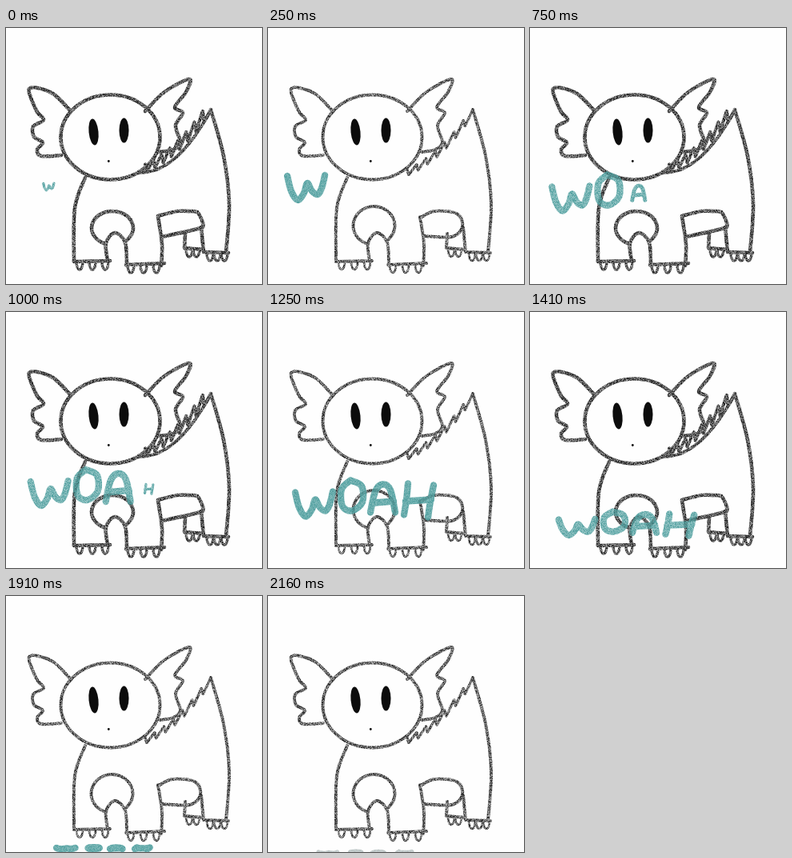
An HTML page with a canvas for the animation above (10 s loop, 320 by 320 pixels).

```html
<!DOCTYPE html>
<html lang="en">
<head>
<meta charset="utf-8">
<title>Woah</title>
<style>
html, body { margin: 0; width: 100%; height: 100%; overflow: hidden; background: #fefefe; }
canvas { display: block; width: 100vw; height: 100vh; }
</style>
</head>
<body>
<canvas id="stage" width="320" height="320"></canvas>
<script>
const SIZE = 320, LOOP = 10000, LAST = 26;
const ctx = document.getElementById('stage').getContext('2d');
const clamp = (v, lo, hi) => Math.min(hi, Math.max(lo, v));
const points = s => s.split(' ').map(p => p.split(',').map(Number));

function layer() {
  const c = document.createElement('canvas');
  c.width = c.height = SIZE;
  const g = c.getContext('2d');
  g.lineCap = g.lineJoin = 'round';
  return g;
}

function random(seed) {
  return () => {
    seed = (Math.imul(seed, 1664525) + 1013904223) >>> 0;
    return seed / 4294967296;
  };
}

// Speckle that is rubbed out of a stroke to give it a crayon grain
function grain(seed, strength) {
  const g = layer(), img = g.createImageData(SIZE, SIZE), rnd = random(seed);
  for (let i = 3; i < img.data.length; i += 4) img.data[i] = 255 * strength * rnd();
  g.putImageData(img, 0, 0);
  return g.canvas;
}

function rub(g, mask) {
  g.globalCompositeOperation = 'destination-out';
  g.drawImage(mask, 0, 0);
  g.globalCompositeOperation = 'source-over';
}

function soften(g) {
  const out = layer();
  out.filter = 'blur(0.5px)';
  out.drawImage(g.canvas, 0, 0);
  return out.canvas;
}

// Smooth curve through all points; tension 0 gives straight segments
function curve(g, p, tension = 1) {
  const k = tension / 6;
  g.beginPath();
  g.moveTo(...p[0]);
  for (let i = 0; i < p.length - 1; i++) {
    const a = p[i - 1] || p[i], b = p[i], c = p[i + 1], d = p[i + 2] || c;
    g.bezierCurveTo(b[0] + (c[0] - a[0]) * k, b[1] + (c[1] - a[1]) * k,
      c[0] - (d[0] - b[0]) * k, c[1] - (d[1] - b[1]) * k, c[0], c[1]);
  }
  g.stroke();
}

function oval(g, x, y, rx, ry, turn = 0, from = 0, to = 7) {
  g.beginPath();
  g.ellipse(x, y, rx, ry, turn, from, to);
}

// The back line, s pixels to the left of the tail tip
const back = (s, dy) => [256 - s, 104 + 1.45 * s - 0.0065 * s * s + dy];

function mane(g, { teeth, up, down }) {
  const zig = [[256, 102]], gap = 82 / teeth;
  for (let i = 1; i <= teeth; i++) {
    zig.push(back(gap * i - 2, down), back(gap * i, up * (1 - 0.4 * i / teeth)));
  }
  curve(g, zig, 0.3);
}

const outlines = [
  '81,104 60,83 40,75 29,76 31,87 39,105 47,115 34,123 35,136 46,143 39,152 44,160 69,159',
  '174,104 198,80 229,64 225,80 211,99 221,106 212,122 218,143 209,152 192,155',
  '99,187 86,225 85,292',
  '256,102 272,160 279,220 275,281',
  '127,291 125,269 136,256 149,268 151,297',
  '194,297 195,270 190,236'
].map(points);
const feet = ['85,292 130,291', '150,296 198,294', '224,257 223,275 247,277', '244,249 247,280 278,281'].map(points);
const toes = [[92, 292, 3, 16], [156, 296, 3, 16], [229, 276, 2, 9], [255, 281, 3, 9]];

const looks = [
  { width: 4.6, ink: '#161616', erase: 0.62, knee: [133, 250, 26, 21],
    thigh: '190,235 214,229 239,230 246,249 195,261', bend: 0.4,
    mane: { teeth: 8, up: -15, down: 1 }, spine: true },
  { width: 3.9, ink: '#1e1e1e', erase: 0.68, knee: [132.5, 247, 26, 24],
    thigh: '191,237 208,229 236,232 243,248 230,261 196,260', bend: 1,
    mane: { teeth: 7, up: -5, down: 5 } }
];

function creature(look, i) {
  const g = layer();
  g.strokeStyle = g.fillStyle = look.ink;
  g.lineWidth = look.width;
  oval(g, 130.5, 136.5, 62, 53);
  g.stroke();
  oval(g, ...look.knee, 0, 2, 7.1);
  g.stroke();
  outlines.forEach(p => curve(g, p));
  feet.forEach(p => curve(g, p, 0));
  curve(g, points(look.thigh), look.bend);
  g.lineWidth = look.width - 0.6;
  mane(g, look.mane);
  if (look.spine) curve(g, [0, 22, 45, 68, 90].map(s => back(s, 7 * Math.sin(s / 28))));
  g.lineWidth = look.width - 1.2;
  for (const [x0, y, n, step] of toes) {
    for (let x = x0; x < x0 + n * step; x += step) {
      oval(g, x, y, 4, 10, 0, 0, Math.PI);
      g.stroke();
    }
  }
  rub(g, grain(11 + i, look.erase));
  g.fillStyle = '#0c0c0c';
  for (const eye of [[109.5, 130, 6, 16.5, -0.1], [147.5, 128, 6, 15.5, 0], [128.3, 166.5, 1.4, 1.4]]) {
    oval(g, ...eye);
    g.fill();
  }
  return soften(g);
}

const poses = looks.map(creature);
const chalk = [grain(31, 0.45), grain(32, 0.3)];

const letters = [
  { x: 57, lift: 0, strokes: ['-23,-13 -18,6 -10,17 -2,8 2,-4 8,6 15,10 20,2 24,-14'] },
  { x: 105, lift: 9, strokes: ['-2,-19 -13,-8 -12,13 0,19 13,8 12,-12 -2,-19'] },
  { x: 144, lift: 5, strokes: ['-16,17 -10,-9 -1,-18 9,-11 15,17', '-11,5 13,3'] },
  { x: 188, lift: 4, strokes: ['-13,-20 -15,0 -18,19', '19,-18 15,2 12,22', '-16,2 16,0'] }
];
letters.forEach(l => l.strokes = l.strokes.map(points));

// Letters pop up every four steps, sink, then flatten out on the floor
function drawWord(k, pose) {
  const g = layer();
  const fall = clamp((k - 15) / 8, 0, 1), gone = Math.max(0, k - 23);
  const floor = 198 + 4.5 * clamp(k - 6, 0, 9) + 77 * Math.sin(fall * Math.PI / 2) + 1.7 * gone;
  const flat = Math.max(0.05, (1 - fall) ** 1.5);
  const narrow = 1 - 0.5 * fall ** 2;
  const drift = 1.1 * Math.max(0, 15 - Math.max(6, k));
  g.strokeStyle = k === LAST ? '#b8c2c2' : '#509f9f';
  letters.forEach(({ x, lift, strokes }, i) => {
    const age = k - 4 * i;
    if (age < 0) return;
    const grow = Math.min(1, 0.28 + 0.24 * age);
    const spread = (1 - 0.13 * (1 - grow)) * (1 - 0.27 * fall ** 2);
    const cx = 122 + (x - 122) * spread - drift, cy = floor - lift * flat;
    g.lineWidth = 1.3 + 7 * grow - gone;
    for (const s of strokes) {
      curve(g, s.map(([px, py]) => [cx + px * grow * narrow, cy + py * grow * flat]));
    }
  });
  rub(g, chalk[pose]);
  return soften(g);
}

const words = Array.from({ length: LAST + 1 }, (_, k) => drawWord(k, (k >> 1) % 2));

// Twelve steps a second, on whole hundredths
const start = step => Math.floor(step * 100 / 12) * 10;

function render(now) {
  const t = now % LOOP;
  let k = 0;
  while (k < LAST && t >= start(k + 1)) k++;
  ctx.fillStyle = '#fefefe';
  ctx.fillRect(0, 0, SIZE, SIZE);
  ctx.drawImage(poses[(k >> 1) % 2], 0, 0);
  ctx.drawImage(words[k], 0, 0);
}

let origin;
function tick() {
  const now = performance.now();
  if (origin === undefined) origin = now;
  render(now - origin);
  requestAnimationFrame(tick);
}
tick();
</script>
</body>
</html>
```
